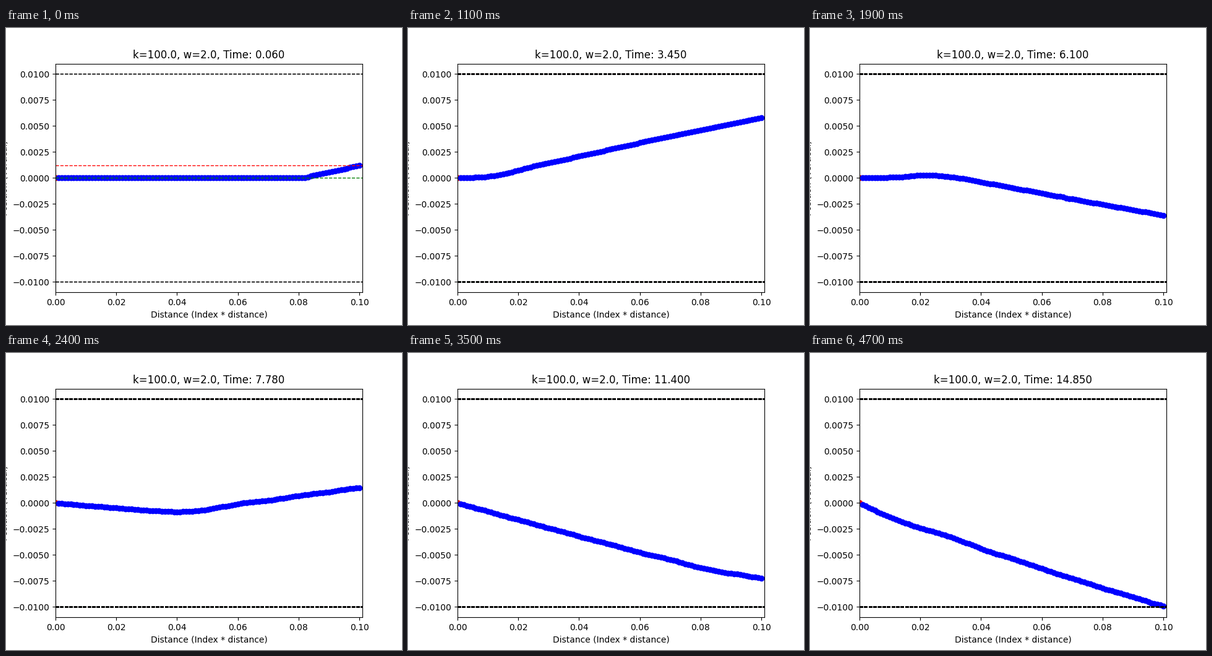
Write a matplotlib script that moves like this. It is 640 by 480 pixels and loops after 4800 ms.

```python
import numpy as np
import matplotlib.pyplot as plt
from matplotlib.animation import FuncAnimation

FRAMES, INTERVAL = 48, 100
N, SPACING = 100, 0.001            # masses right of the wall
K, MASS, AMP, OMEGA = 100.0, 0.001, 0.01, 2.0
DT = 0.001

# The clock runs slightly unevenly: (frame, simulated time)
CLOCK = [(0, 0.06), (7, 2.36), (11, 3.45), (17, 5.37), (19, 6.10),
         (28, 9.12), (35, 11.40), (37, 11.78), (40, 12.94), (47, 14.85)]
times = np.round(np.interp(np.arange(FRAMES), *zip(*CLOCK)), 2)


def simulate():
    """Spring chain fixed at the left, driven by a sine at the right."""
    steps = np.rint(times / DT).astype(int)
    pos, vel = np.zeros(N + 1), np.zeros(N + 1)
    shots = {}
    for step in range(1, steps[-1] + 1):
        vel[1:-1] += K / MASS * DT * (pos[2:] - 2 * pos[1:-1] + pos[:-2])
        pos[1:-1] += DT * vel[1:-1]
        pos[-1] = AMP * np.sin(OMEGA * step * DT)
        shots[step] = pos[1:].copy()
    return [shots[s] for s in steps]


def extremes(t):
    """Highest and lowest drive position reached up to time t."""
    drive = AMP * np.sin(OMEGA * np.append(np.arange(0, t, DT), t))
    return drive.max(), drive.min()


shapes = simulate()
limits = [extremes(t) for t in times]

fig, ax = plt.subplots(figsize=(6.4, 4.8), dpi=100)
ax.set_xlim(0, (N + 1) * SPACING)
ax.set_ylim(-1.1 * AMP, 1.1 * AMP)
ax.set_xlabel("Distance (Index * distance)")
ax.set_ylabel("Position (Vertical)")
title = ax.set_title("")

ax.plot([0], [0], "ro")
chain, = ax.plot(SPACING * np.arange(1, N + 1), shapes[0], "bo")


def level(y, color):
    return ax.axhline(y, color=color, linestyle="--", linewidth=1)


high, low = level(0, "red"), level(0, "green")
# Bounds are drawn once more every frame, so their soft edges darken
bounds = [(level(AMP, "black"), level(-AMP, "black"))
          for _ in range(FRAMES + 1)]


def update(i):
    chain.set_ydata(shapes[i])
    for line, y in zip((high, low), limits[i]):
        line.set_ydata([y, y])
    for n, pair in enumerate(bounds):
        for line in pair:
            line.set_visible(n <= i + 1)
    title.set_text(f"k={K}, w={OMEGA}, Time: {times[i]:.3f}")
    return chain, title


anim = FuncAnimation(fig, update, frames=FRAMES, interval=INTERVAL,
                     repeat=True, repeat_delay=0)
plt.show()
```
